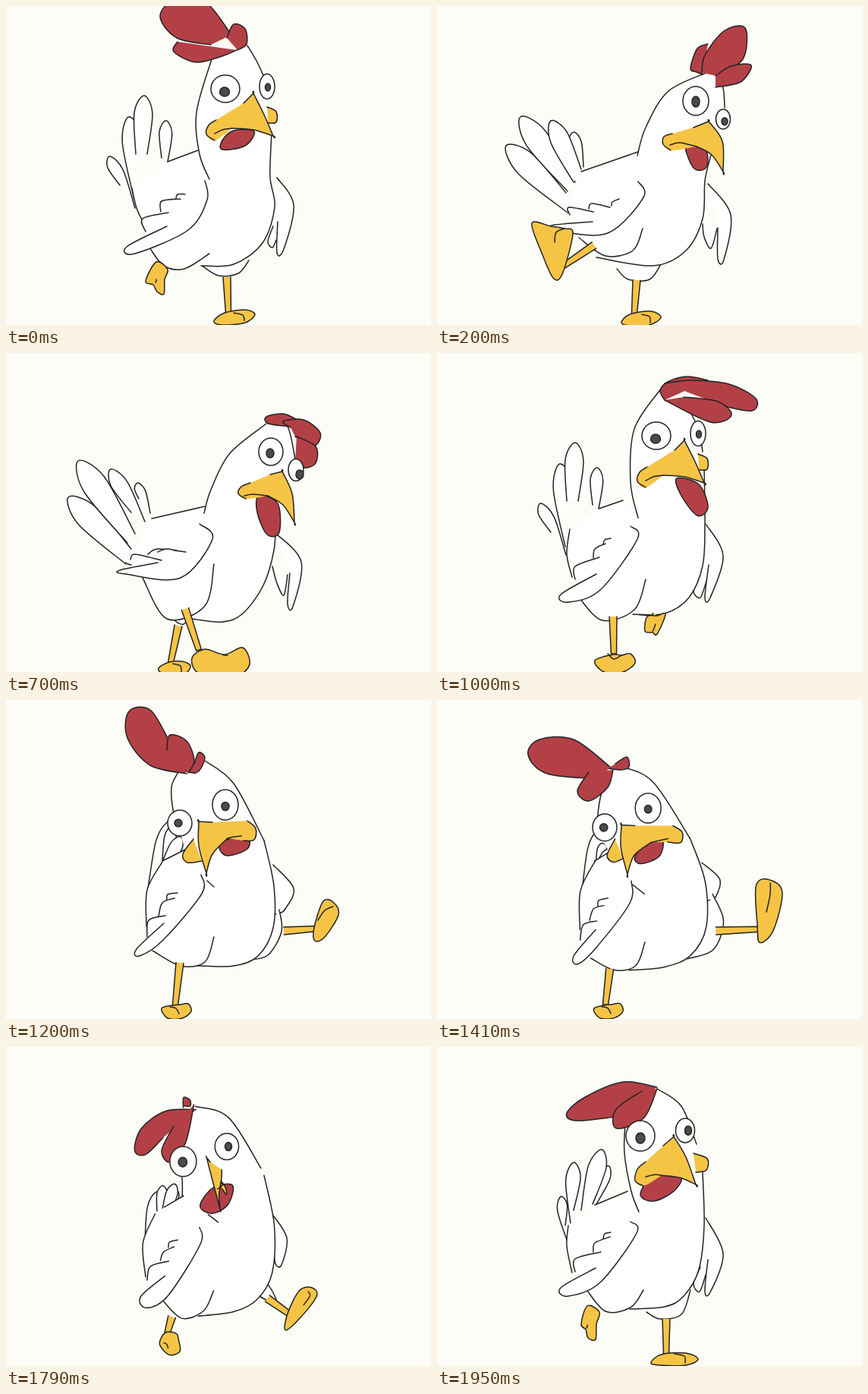
An HTML page for the animation above (2000 ms loop, 560 by 420 pixels).

```html
<!DOCTYPE html>
<html>
<head>
<meta charset="utf-8">
<style>
html,body{margin:0;width:100%;height:100%;overflow:hidden;background:#fcfdf6}
svg{display:block;width:560px;height:420px}
</style>
</head>
<body>
<svg id="stage" viewBox="0 0 560 420" stroke-width="1.5" stroke-linecap="round" stroke-linejoin="round"></svg>
<script>
const FPS = 24, LOOP = 48;
const WHITE = '#fff', RED = '#b34047', YELLOW = '#f6c445', INK = '#242424';
const BEATS = [0, 5, 17, 24, 29, 39, 47];
const rig = {};

// Poses are split by "/", one per beat; "=" repeats the first, "@n" adds a pose at beat n.
function track(name, text) {
  const poses = text.split('/').map(s => s.trim());
  rig[name] = poses.map((pose, i) => {
    const words = (pose === '=' ? poses[0] : pose).split(/\s+/);
    const t = words[0][0] === '@' ? +words.shift().slice(1) : BEATS[i];
    return { t, v: words.map(Number) };
  }).sort((a, b) => a.t - b.t);
}

// Feathers: base, tip, base.
track('tailA', '170 266 137 198 150 236 / 172 272 91 184 170 246 / 158 278 82 190 165 258 / = / 187 248 212 161 216 172 / 192 265 212 184 222 200 / 171 254 163 197 169 235');
track('tailB', '169 255 160 147 172 185 / 172 244 110 146 182 232 / 160 250 95 142 170 238 / = / 206 212 218 166 222 190 / 211 210 218 202 224 215 / 176 232 180 152 180 215');
track('tailC', '171 195 182 118 186 195 / 180 232 150 151 190 215 / 165 210 138 153 183 222 / = / 206 213 230 180 222 215 / 212 215 225 203 222 220 / 190 215 217 135 205 207');
track('tailD', '205 200 211 151 213 205 / 176 195 181 166 193 212 / 175 192 174 171 190 211 / = / 215 215 226 208 222 218 / 215 218 226 210 222 222 / 213 185 227 157 210 207');

track('farWing', '357 226 379 262 366 320 357 325 358 284 / 357 234 387 275 378 334 370 333 370 292 / 355 237 389 275 378 334 371 330 374 290 / 354 225 377 267 360 322 353 322 358 279 / 352 217 379 248 368 275 360 281 354 282 / 347 213 366 230 366 252 358 255 350 252 / 354 225 377 272 361 321 353 323 357 280');
track('farTip', '352 290 345 310 351 318 356 308 / 350 287 352 304 361 319 369 293 / 351 281 357 303 366 319 371 292 / 345 295 338 314 347 322 355 300 / 335 280 332 300 338 302 344 284 / 335 280 332 300 338 302 344 284 / 347 290 338 312 346 322 354 300');
track('thigh', '257 341 280 355 306 352 320 335 / 237 346 252 360 280 360 295 340 / 222 352 228 356 234 357 240 350 / 258 343 270 345 288 345 302 340 / 360 276 363 305 345 336 319 342 / 364 247 383 285 372 325 334 338 / 276 349 294 358 322 352 334 320');

track('headL', '271 70 251 140 255 195 268 228 / 360 86 305 112 275 160 264 197 / 343 93 295 132 270 180 261 211 / 296 46 260 100 255 170 265 217 / 227 95 218 115 221 150 228 170 / 226 100 216 130 208 160 205 185 / 248 100 247 140 256 190 266 217');
track('headR', '318 52 331 74 341 96 / 368 92 377 108 379 134 / 345 93 370 95 381 140 / 335 80 345 102 350 130 / 262 80 300 110 340 185 / 232 94 278 103 330 175 / 290 55 322 78 342 128');
track('front', '350 166 348 225 354 265 338 312 300 340 257 342 / 361 196 353 230 350 280 328 322 285 342 210 331 / 355 222 353 260 339 306 312 343 285 354 245 350 / 352 150 353 225 350 280 332 322 300 343 258 344 / 340 185 353 245 352 300 332 337 300 350 253 350 / 330 175 354 235 356 300 336 335 300 352 253 359 / 350 165 352 235 345 293 325 328 300 342 254 345');
track('hip', '268 326 235 346 208 342 189 318 / 271 293 258 322 222 329 187 305 / 274 278 262 333 212 350 180 296 / 275 298 260 338 218 352 187 322 / 274 312 262 345 230 350 193 330 / 274 322 262 352 235 361 209 346 / 272 320 255 343 222 348 196 318');
track('back', '166 240 172 266 181 285 / 172 268 173 270 174 273 / 158 276 161 278 165 279 / 175 232 171 265 178 295 / 206 213 186 250 185 298 / 209 212 190 255 190 305 / 173 235 171 262 178 297');
track('spine', '213 205 253 190 / 190 218 265 192 / 192 218 262 202 / 213 205 245 194 / 206 212 236 197 / 209 212 222 202 / 208 208 251 190');

track('wing', '262 230 265 255 240 295 170 326 159 317 212 290 / 265 231 272 252 225 299 160 296 151 289 205 284 / 255 225 272 245 230 296 158 291 150 286 200 276 / 255 228 264 245 215 312 173 328 163 318 210 291 / 257 230 258 255 207 316 176 337 172 328 208 294 / 255 245 252 275 212 335 192 354 185 341 210 309 / 255 230 263 245 215 310 173 328 163 317 209 291');
track('quillA', '184 297 180 280 214 272 / 175 275 174 265 206 271 / 164 272 170 265 205 273 / 182 298 182 281 214 269 / 186 312 188 290 210 284 / 190 318 195 299 212 294 / 182 296 182 279 216 270');
track('quillB', '204 271 205 257 230 254 / 200 267 204 260 228 265 / 187 265 200 258 237 262 / 206 270 208 258 222 251 / 201 285 206 267 222 261 / 201 292 207 279 218 276 / 206 270 208 258 228 250');
track('quillC', '224 254 226 248 236 248 / 230 263 231 258 240 254 / 200 262 211 258 225 260 / 219 252 221 246 229 244 / 212 263 213 256 226 254 / 212 276 213 268 225 264 / 219 252 221 246 229 244');
track('chin', '300 172 304 175 / 340 195 344 198 / 345 205 349 210 / 335 185 339 189 / 265 238 274 246 / 255 245 273 259 / 290 180 294 184');

track('combA', '297 38 262 -6 222 -8 203 14 225 42 270 51 / 368 92 403 70 406 29 378 33 353 65 349 88 / 381 110 406 122 414 105 392 88 365 90 375 98 / 378 70 415 76 420 60 385 41 335 36 300 40 / 214 52 190 13 162 15 160 50 190 86 238 97 / 226 96 190 99 166 122 168 155 185 159 196 130 / 290 53 245 46 195 66 171 87 183 97 235 92 / @10 380 105 435 98 457 78 435 63 395 70 362 90 / @26 300 62 332 20 318 -12 285 -5 260 35 262 66 / @34 228 88 180 52 135 52 120 72 145 97 215 104');
track('combB', '226 47 221 60 250 74 285 66 304 58 / 357 50 343 56 334 82 342 87 350 90 / 382 87 365 80 343 84 346 93 376 97 / 357 36 330 31 304 38 294 50 300 62 / 248 84 254 69 262 77 250 96 222 88 / 197 97 210 80 230 83 234 94 215 97 / 270 52 258 53 255 60 264 62 280 58 / @10 385 74 365 70 341 88 350 92 370 95 / @26 262 40 245 48 250 66 262 70 270 66 / @34 235 84 250 75 253 88 242 92 225 90');
track('combC', '291 42 300 24 315 30 317 50 305 58 / 367 92 388 79 414 78 400 100 367 107 / 383 110 408 123 408 145 392 151 381 141 / 325 58 370 64 388 82 360 91 300 62 / 212 66 216 46 238 54 248 80 240 96 / 197 128 191 158 207 168 223 138 226 97 / 270 58 236 82 236 107 272 94 290 55 / @10 381 98 410 102 424 120 402 128 380 118 / @26 290 50 310 41 322 50 308 68 285 72 / @34 200 95 185 120 200 133 225 115 232 92');
track('wattle', '300 164 327 165 315 184 285 189 285 177 / 330 184 354 190 355 212 340 215 329 194 / 333 188 358 198 360 236 344 239 331 210 / 316 165 345 173 357 203 343 214 322 188 / 290 184 318 181 318 196 292 205 281 195 / 268 193 286 187 280 216 258 226 251 215 / 285 170 321 171 312 190 285 203 268 194');

// Eyes: centre and radii, then the same for the pupil.
track('eyeL', '289 109 19 18 288 113 6.5 6 / 341 125 17 19 341 126 5 7 / 349 130 16 18 348 132 5 6 / = / 229 162 16 17 227 162 5 5 / 218 170 16 19 217 170 5.5 5.5 / 268 117 19 20 268 120 6 7');
track('eyeR', '344 106 10 16.5 345 107 3.5 5 / 377 149 9.5 13 379 152 4 5 / 382 154 10 14.5 387 160 5 6 / = / 289 138 17 20 289 140 5 5.5 / 274 144 17 19 274 145 4.5 5 / 327 110 12.5 16 331 110 4.5 6');

// Beak: start, ridge, side, tip, underside, mouth corner.
track('beak', '313 128 326 115 340 143 352 171 326 163 298 161 / 338 160 358 152 376 178 377 218 362 196 342 185 / 348 160 364 156 377 185 380 223 365 200 345 188 / = / 272 161 254 160 254 192 264 228 272 203 292 182 / 256 167 239 166 238 195 246 230 255 205 275 190 / 298 130 312 118 328 145 341 181 320 172 296 169');
track('lip', '275 177 264 169 267 157 277 150 / 308 190 298 182 299 172 310 168 / 316 192 306 185 310 176 322 171 / = / 313 185 327 184 329 169 318 159 / 290 188 308 189 310 176 298 169 / 272 183 261 176 264 161 275 151');
track('mouth', '275 168 285 163 / 307 183 320 180 / 314 188 325 186 / = / 310 179 301 180 / 294 184 285 187 / 275 171 287 168');
track('cheek', '344 133 356 139 356 153 345 154 / 360 165 366 170 365 175 360 176 / 362 168 367 172 367 177 362 179 / = / 247 183 233 203 239 214 258 212 / 230 182 221 205 230 212 241 200 / 338 140 356 147 355 162 341 165');

// Shanks: hip, ankle.
track('shankR', '291 357 293 404 / 263 361 260 405 / 227 359 217 408 / 289 345 285 351 / 366 304 410 301 / 368 304 430 304 / 302 358 302 404');
track('footR', '274 415 288 404 315 400 328 406 315 417 285 420 / 243 417 254 406 282 402 295 410 280 420 255 421 / 201 415 215 407 232 406 243 412 235 422 208 422 / 277 347 274 366 284 368 290 370 301 344 290 346 / 407 317 406 300 418 265 432 267 438 283 420 312 / 432 326 428 295 421 238 436 223 461 238 452 300 / 282 416 295 405 328 403 344 411 328 419 295 419');
track('toeR', '300 404 312 407 314 414 / 270 406 280 409 281 417 / 220 409 230 412 231 420 / 288 357 285 365 284 366 / 411 290 420 277 431 272 / 443 275 446 248 442 228 / 313 404 326 407 327 416');
track('shankL', '204 342 198 348 / 207 315 167 342 / 236 337 254 391 / 232 347 233 396 / 229 346 223 402 / 226 362 221 399 / 207 344 200 350 / @12 200 310 125 310');
track('footL', '198 337 184 362 194 367 199 376 208 379 209 360 213 347 / 150 290 125 286 138 325 153 358 165 353 179 300 168 293 / 262 390 245 402 255 422 302 425 321 410 312 388 288 397 / 232 397 208 405 220 420 245 420 261 408 255 396 243 398 / 220 402 205 406 213 419 232 419 244 410 240 400 230 401 / 222 401 208 407 216 418 235 418 246 409 242 399 232 400 / 198 341 190 365 196 372 199 383 209 385 210 365 214 349 / @12 108 228 93 245 100 305 112 326 127 300 135 240 122 226');
track('toeL', '198 360 198 362 197 364 / 155 311 157 298 168 293 / 285 397 288 398 292 398 / 225 396 233 403 243 398 / 216 404 224 406 228 413 / 218 403 226 405 230 412 / 198 366 198 368 197 370 / @12 112 275 114 250 116 232');

// Monotone cubic interpolation around the loop.
function sample(keys, t) {
  const n = keys.length;
  const at = i => {
    const k = keys[(i + n) % n];
    return { t: k.t + LOOP * Math.floor(i / n), v: k.v };
  };
  let i = n - 1;
  while (keys[i].t > t) i--;
  const [a, b, c, d] = [-1, 0, 1, 2].map(o => at(i + o));
  const h = c.t - b.t, u = (t - b.t) / h;
  const tangent = (p, q) => p * q > 0 ? 2 * p * q / (p + q) : 0;
  return b.v.map((y, j) => {
    const s0 = (y - a.v[j]) / (b.t - a.t), s1 = (c.v[j] - y) / h;
    const s2 = (d.v[j] - c.v[j]) / (d.t - c.t);
    const m0 = tangent(s0, s1) * h, m1 = tangent(s1, s2) * h;
    const w = u * u * (3 - 2 * u);
    return y + (c.v[j] - y) * w + u * (1 - u) * ((1 - u) * m0 - u * m1);
  });
}

const pairs = v => Array.from({ length: v.length / 2 }, (_, i) => [v[2 * i], v[2 * i + 1]]);
const xy = p => p[0].toFixed(1) + ' ' + p[1].toFixed(1);

// Smooth curve through points, without the leading move command.
function curve(p, closed) {
  const n = p.length;
  const pick = i => closed ? p[(i + n) % n] : p[Math.max(0, Math.min(n - 1, i))];
  let d = xy(p[0]);
  for (let i = 0; i < (closed ? n : n - 1); i++) {
    const [a, b, c, e] = [-1, 0, 1, 2].map(o => pick(i + o));
    d += 'C' + [
      [b[0] + (c[0] - a[0]) / 6, b[1] + (c[1] - a[1]) / 6],
      [c[0] - (e[0] - b[0]) / 6, c[1] - (e[1] - b[1]) / 6], c].map(xy).join(' ');
  }
  return d;
}

const path = (d, fill = 'none', stroke = INK) =>
  `<path d="M${d}" fill="${fill}" stroke="${stroke}"/>`;
const oval = (x, y, rx, ry, fill) =>
  `<ellipse cx="${x}" cy="${y}" rx="${rx}" ry="${ry}" fill="${fill}" stroke="${INK}"/>`;
const eye = ([x, y, rx, ry, px, py, prx, pry]) =>
  oval(x, y, rx, ry, WHITE) + oval(px, py, prx, pry, '#4b4b4b');

function feather([a, tip, b]) {
  const dx = tip[0] - (a[0] + b[0]) / 2, dy = tip[1] - (a[1] + b[1]) / 2;
  const len = Math.hypot(dx, dy) || 1;
  const side = Math.sign((b[0] - a[0]) * dy - (b[1] - a[1]) * dx);
  const w = side * (2 + len * .1) / len;
  const bulge = (p, s) => [
    p[0] + (tip[0] - p[0]) * .7 - s * w * dy,
    p[1] + (tip[1] - p[1]) * .7 + s * w * dx];
  return path(curve([a, bulge(a, 1), tip, bulge(b, -1), b]), WHITE);
}

function shank([hip, ankle]) {
  const dx = ankle[0] - hip[0], dy = ankle[1] - hip[1], len = Math.hypot(dx, dy) || 1;
  const off = (p, w) => [p[0] - dy / len * w, p[1] + dx / len * w];
  return path([off(hip, 5), off(ankle, 3.5), off(ankle, -3.5), off(hip, -5)].map(xy).join('L'), YELLOW);
}

const stage = document.getElementById('stage');

function draw(t) {
  const raw = {}, pts = {};
  for (const name in rig) {
    raw[name] = sample(rig[name], t);
    pts[name] = pairs(raw[name]);
  }
  const open = (fill, ...names) => names.map(n => path(curve(pts[n]), fill)).join('');
  const shut = (fill, name) => path(curve(pts[name], true) + 'Z', fill);
  const blob = (fill, ...runs) => path(runs.map(r => curve(r)).join('L') + 'Z', fill, 'none');
  const flip = name => [...pts[name]].reverse();
  const leg = side => shank(pts['shank' + side]) +
    shut(YELLOW, 'foot' + side) + open('none', 'toe' + side);

  const [start, ridge, flank, tip, under, corner] = pts.beak;
  const beak = [start, ridge, ridge, flank, tip, tip, under, corner];

  stage.innerHTML =
    ['tailA', 'tailD', 'tailB', 'tailC'].map(n => feather(pts[n])).join('') +
    open(WHITE, 'farTip', 'farWing', 'thigh') +
    blob(WHITE, flip('headL'), pts.headR, pts.front, pts.hip.slice(2), flip('back'), pts.spine) +
    open('none', 'headL', 'headR', 'front', 'hip', 'back', 'spine') +
    open(WHITE, 'wing', 'quillA', 'quillB', 'quillC') +
    open('none', 'chin') +
    leg('R') + leg('L') +
    open(RED, 'combB', 'combA', 'combC') +
    shut(RED, 'wattle') +
    open(YELLOW, 'cheek') +
    blob(YELLOW, beak, [corner, ...pts.lip]) +
    eye(raw.eyeL) + eye(raw.eyeR) +
    path(curve(beak)) + path(curve([...pts.mouth, corner])) + open('none', 'lip');
}

const begun = performance.now();
let shown = -1;
function tick() {
  const ms = (performance.now() - begun) % 2000;
  // Drawing changes land on whole hundredths of a second.
  const frame = Math.floor((Math.floor(ms / 10) * 10 + 9.99) * FPS / 1000) % LOOP;
  if (frame !== shown) draw(shown = frame);
  requestAnimationFrame(tick);
}
tick();
</script>
</body>
</html>
```
